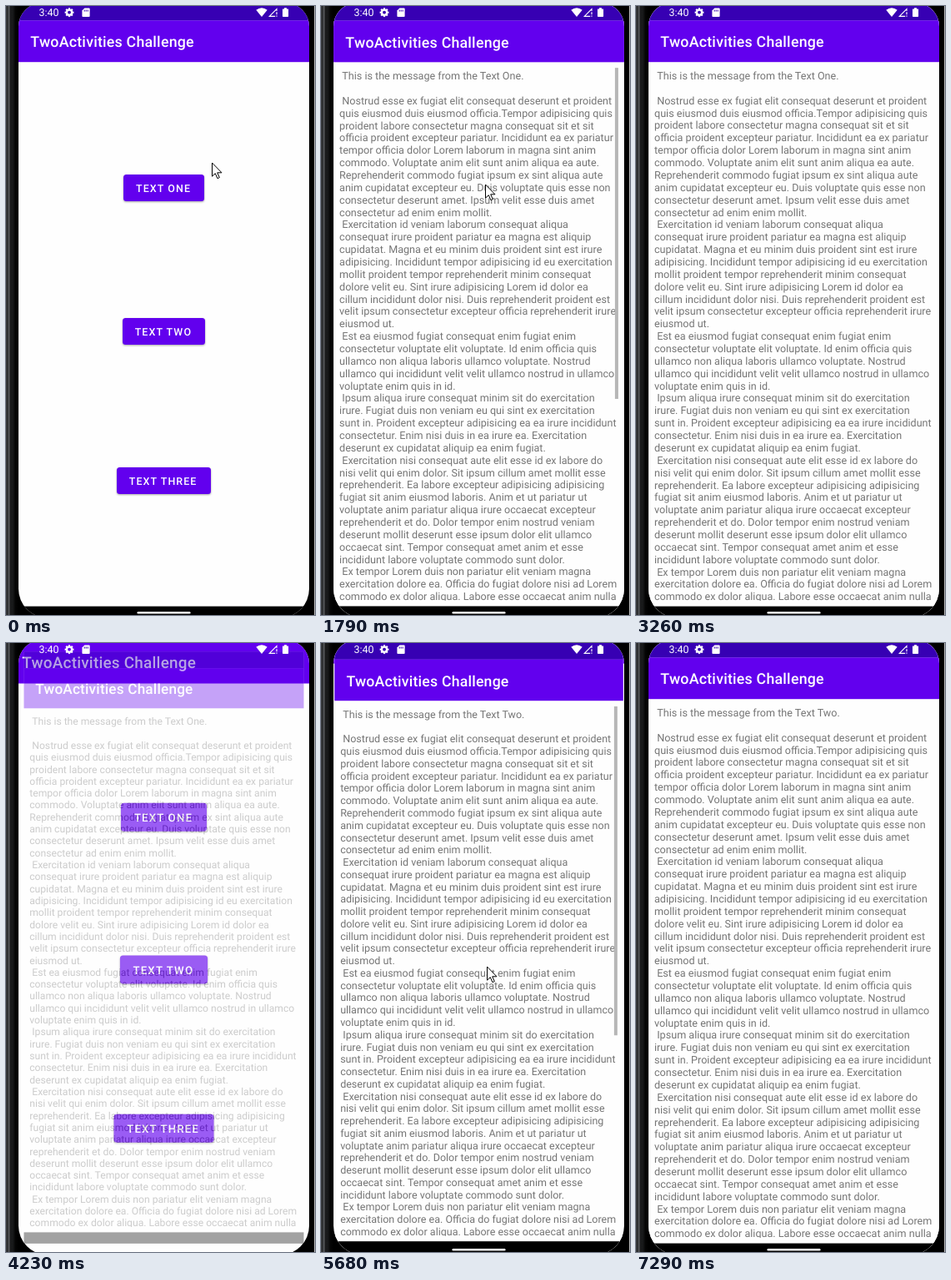
Animation, 371 px wide and 730 px high, one loop 8000 ms. Source, as an HTML page:

```html
<!DOCTYPE html>
<html lang="en">
<head>
<meta charset="utf-8">
<title>Two screens</title>
<style>
html, body { margin: 0; width: 100%; height: 100%; overflow: hidden; background: #000; }
svg { display: block; width: 371px; height: 730px; }
text { font-family: Roboto, "Noto Sans", sans-serif; text-rendering: geometricPrecision; }
.title { font-size: 17.77px; font-weight: 500; letter-spacing: .22px; fill: #fff; }
.label { font-size: 12.44px; font-weight: 500; letter-spacing: 1.11px; fill: #fff; }
.body { font-size: 12.6px; fill: #757575; }
.btn rect { fill: #6200ee; filter: drop-shadow(0 1px 1px rgba(0,0,0,.35)); }
.btn.down rect { filter: drop-shadow(0 2.5px 1.8px rgba(0,0,0,.4)); }
</style>
</head>
<body>
<svg viewBox="0 0 371 730">
  <defs>
    <linearGradient id="edge">
      <stop offset="0" stop-color="#3c3e41"/>
      <stop offset=".14" stop-color="#26282a"/>
      <stop offset=".24" stop-color="#5d5f62"/>
      <stop offset=".34" stop-color="#1a1b1c"/>
      <stop offset=".55" stop-color="#18191a"/>
      <stop offset=".75" stop-color="#050505"/>
      <stop offset="1" stop-color="#000"/>
    </linearGradient>
    <clipPath id="display">
      <path d="M15 24.5a28 28 0 0 1 28-28H336a28 28 0 0 1 28 28V698.5a35 35 0 0 1-35 35H50a35 35 0 0 1-35-35Z"/>
    </clipPath>
    <clipPath id="scroll"><rect x="20" y="74" width="340" height="639"/></clipPath>
    <g id="frame">
      <rect x="15" y="-3.5" width="349" height="737" fill="#fefefe"/>
      <rect x="15" y="-3.5" width="349" height="21" fill="#3700b3"/>
      <rect x="15" y="17.3" width="349" height="49.9" fill="#6200ee"/>
      <rect x="15" y="719.6" width="349" height="14" fill="#000"/>
      <text class="title" x="29.3" y="49.4">TwoActivities Challenge</text>
    </g>
  </defs>

  <rect width="371" height="730" fill="#000"/>
  <rect width="15" height="730" fill="url(#edge)"/>
  <rect x="370" width="1" height="730" fill="#b4b4b4"/>

  <g clip-path="url(#display)">
    <g id="home"><use href="#frame"/></g>
    <g id="page">
      <use href="#frame"/>
      <g id="lines" class="body" clip-path="url(#scroll)"></g>
      <rect id="bar" x="353" y="74" width="4" height="397" fill="#b7b7b7"/>
    </g>
    <g fill="#fff">
      <text x="39.6" y="12.4" font-size="12.4">3:40</text>
      <g id="gear" transform="translate(76 7.7)">
        <circle r="3.1" fill="none" stroke="#fff" stroke-width="2.4"/>
      </g>
      <path d="M94.4 2.4H99.6a1 1 0 0 1 1 1V12a1 1 0 0 1-1 1H92.4a1 1 0 0 1-1-1V5.4Z"/>
      <path d="M94.2 4.6v2M96.2 4.6v2M98.2 4.6v2" stroke="#3700b3"/>
      <path d="M300.3 4.8Q307 -.4 313.7 4.8L307 13Z"/>
      <path d="M323.2 12.4H316.3L325 3.6V6" fill="none" stroke="#fff" stroke-width="1.1"/>
      <path d="M325 7.3v3M325 11.4v1.4" stroke="#fff" stroke-width="1.2"/>
      <path d="M334 2.2h3v1.2h1.4a.7.7 0 0 1 .7.7V12.3a.7.7 0 0 1-.7.7H332.7a.7.7 0 0 1-.7-.7V4.1a.7.7 0 0 1 .7-.7H334Z"/>
      <rect x="157.5" y="726" width="64" height="2.4" rx="1.2"/>
    </g>
  </g>
  <path id="mouse" d="M0 0V16.2L3.8 12.7 6.4 18.7 8.8 17.6 6.2 11.8H11.5Z" fill="#fff" stroke="#000" stroke-linejoin="round"/>
</svg>

<script>
const LOOP = 8000;
const OPEN = [1520, 5515], OPEN_MS = 320;
const CLOSE = 4144, CLOSE_MS = 525;
const PRESS = [1310, 5215];
const CENTER = [189.5, 365];

// Moments at which the picture refreshes
const STEPS = [0, 120, 240, 360, 490, 610, 760, 1350, 1490, 1640, 1790, 1910,
  2690, 2810, 2960, 3110, 3260, 4230, 4360, 4510, 4630, 4750, 4890, 5010, 5130,
  5260, 5380, 5530, 5680, 5810, 5940, 6350, 6470, 6590, 7170, 7290];

// time, x, y; no position means hidden
const MOUSE = [[0, 247.5, 188], [120, 244, 182], [240, 235, 178.5], [360, 220, 188],
  [490, 204, 202], [610, 194.5, 211], [760, 197.5, 214], [2690, 128, 140],
  [2810, 22.5, 38.5], [2960, 3, 4], [3110], [4630, 285, 312], [4750, 222, 354],
  [4890, 202, 378], [5010, 197.5, 384], [5130, 199.5, 388], [6350, 118, 206],
  [6470, 22.5, 18.5], [6590]];

const BUTTONS = [
  { label: "TEXT ONE", x: 141, y: 202, w: 97, tx: 156 },
  { label: "TEXT TWO", x: 140, y: 374, w: 99, tx: 154.7 },
  { label: "TEXT THREE", x: 133, y: 553, w: 113, tx: 147.8 }];

const COPY = ` This is the message from the Text One.

 Nostrud esse ex fugiat elit consequat deserunt et proident
quis eiusmod duis eiusmod officia.Tempor adipisicing quis
proident labore consectetur magna consequat sit et sit
officia proident excepteur pariatur. Incididunt ea ex pariatur
tempor officia dolor Lorem laborum in magna sint anim
commodo. Voluptate anim elit sunt anim aliqua ea aute.
Reprehenderit commodo fugiat ipsum ex sint aliqua aute
anim cupidatat excepteur eu. Duis voluptate quis esse non
consectetur deserunt amet. Ipsum velit esse duis amet
consectetur ad enim enim mollit.
 Exercitation id veniam laborum consequat aliqua
consequat irure proident pariatur ea magna est aliquip
cupidatat. Magna et eu minim duis proident sint est irure
adipisicing. Incididunt tempor adipisicing id eu exercitation
mollit proident tempor reprehenderit minim consequat
dolore velit eu. Sint irure adipisicing Lorem id dolor ea
cillum incididunt dolor nisi. Duis reprehenderit proident est
velit ipsum consectetur excepteur officia reprehenderit irure
eiusmod ut.
 Est ea eiusmod fugiat consequat enim fugiat enim
consectetur voluptate elit voluptate. Id enim officia quis
ullamco non aliqua laboris ullamco voluptate. Nostrud
ullamco qui incididunt velit velit ullamco nostrud in ullamco
voluptate enim quis in id.
 Ipsum aliqua irure consequat minim sit do exercitation
irure. Fugiat duis non veniam eu qui sint ex exercitation
sunt in. Proident excepteur adipisicing ea ea irure incididunt
consectetur. Enim nisi duis in ea irure ea. Exercitation
deserunt ex cupidatat aliquip ea enim fugiat.
 Exercitation nisi consequat aute elit esse id ex labore do
nisi velit qui enim dolor. Sit ipsum cillum amet mollit esse
reprehenderit. Ea labore excepteur adipisicing adipisicing
fugiat sit anim eiusmod laboris. Anim et ut pariatur ut
voluptate anim pariatur aliqua irure occaecat excepteur
reprehenderit et do. Dolor tempor enim nostrud veniam
deserunt mollit deserunt esse ipsum dolor elit ullamco
occaecat sint. Tempor consequat amet anim et esse
incididunt labore voluptate commodo sunt dolor.
 Ex tempor Lorem duis non pariatur elit veniam magna
exercitation dolore ea. Officia do fugiat dolore nisi ad Lorem
commodo ex dolor aliqua. Labore esse occaecat anim nulla`;

const $ = id => document.getElementById(id);
const clamp = v => Math.min(1, Math.max(0, v));

function add(parent, tag, attrs, text) {
  const el = document.createElementNS("http://www.w3.org/2000/svg", tag);
  for (const k in attrs) el.setAttribute(k, attrs[k]);
  if (text) el.textContent = text;
  parent.append(el);
  return el;
}

const bez = (s, a, b, c, d) => {
  const r = 1 - s;
  return r * r * r * a + 3 * r * r * s * b + 3 * r * s * s * c + s * s * s * d;
};

// Fast start, very slow finish: two joined cubic curves
function ease(u) {
  if (u <= 0) return 0;
  if (u >= 1) return 1;
  const [xs, ys] = u < 1 / 6
    ? [[0, .05, .1333, 1 / 6], [0, 0, .06, .4]]
    : [[1 / 6, .2083, .25, 1], [.4, .82, 1, 1]];
  let lo = 0, hi = 1;
  for (let i = 0; i < 24; i++) {
    const mid = (lo + hi) / 2;
    if (bez(mid, ...xs) < u) lo = mid; else hi = mid;
  }
  return bez(lo, ...ys);
}

function zoom(el, s) {
  const [x, y] = CENTER;
  el.setAttribute("transform", `translate(${x} ${y}) scale(${s}) translate(${-x} ${-y})`);
}

// Build the parts
for (let i = 0; i < 8; i++)
  add($("gear"), "rect", { x: -1.1, y: -5.4, width: 2.2, height: 2, transform: `rotate(${i * 45})` });

const defs = document.querySelector("defs");
const buttons = BUTTONS.map(({ label, x, y, w, tx }, i) => {
  const box = { x, y, width: w, height: 32, rx: 3.5 };
  add(add(defs, "clipPath", { id: "clip" + i }), "rect", box);
  const g = add($("home"), "g", { class: "btn" });
  add(g, "rect", box);
  const ripple = add(g, "circle", {
    cx: 198, cy: y + 14, r: 0, fill: "#fff", opacity: .24, "clip-path": `url(#clip${i})` });
  add(g, "text", { class: "label", x: tx, y: y + 20.7 }, label);
  return { g, ripple };
});

const rows = COPY.split("\n").map((line, i) => add($("lines"), "text",
  { x: line[0] === " " ? 25.2 : 22, y: 88 + i * 14.865 }, line.trim()));

const last = (list, t, at) => list.reduce((found, v) => at(v) <= t ? v : found);

function draw(now) {
  const t = last(STEPS, now % LOOP, v => v);

  const second = t >= 5000;
  const start = OPEN[+second];
  let homeScale = 1, pageScale = 1, alpha = 0;
  if (t >= CLOSE && !second) {
    const p = ease((t - CLOSE) / CLOSE_MS);
    homeScale = 1.1 - .1 * p;
    pageScale = 1 - .1 * p;
    alpha = 1 - clamp((t - CLOSE - 33) / 83);
  } else if (t >= start) {
    const p = ease((t - start) / OPEN_MS);
    homeScale = 1 + .15 * p;
    pageScale = .85 + .15 * p;
    alpha = clamp((t - start - 50) / 83);
  }
  zoom($("home"), homeScale);
  zoom($("page"), pageScale);
  $("page").setAttribute("opacity", alpha);
  rows[0].textContent = `This is the message from the Text ${second ? "Two" : "One"}.`;
  $("bar").setAttribute("opacity", 1 - clamp((t - (second ? 7040 : 2980)) / 250));

  PRESS.forEach((p, i) => {
    const down = t >= p && t < OPEN[i] + OPEN_MS;
    buttons[i].g.classList.toggle("down", down);
    buttons[i].ripple.setAttribute("r", down ? 70 * clamp((t - p) / 180) : 0);
  });

  const [, x, y] = last(MOUSE, t, m => m[0]);
  $("mouse").setAttribute("visibility", x === undefined ? "hidden" : "visible");
  if (x !== undefined) $("mouse").setAttribute("transform", `translate(${x} ${y})`);
}

const begin = performance.now();
function tick() {
  draw(performance.now() - begin);
  requestAnimationFrame(tick);
}
tick();
</script>
</body>
</html>
```
